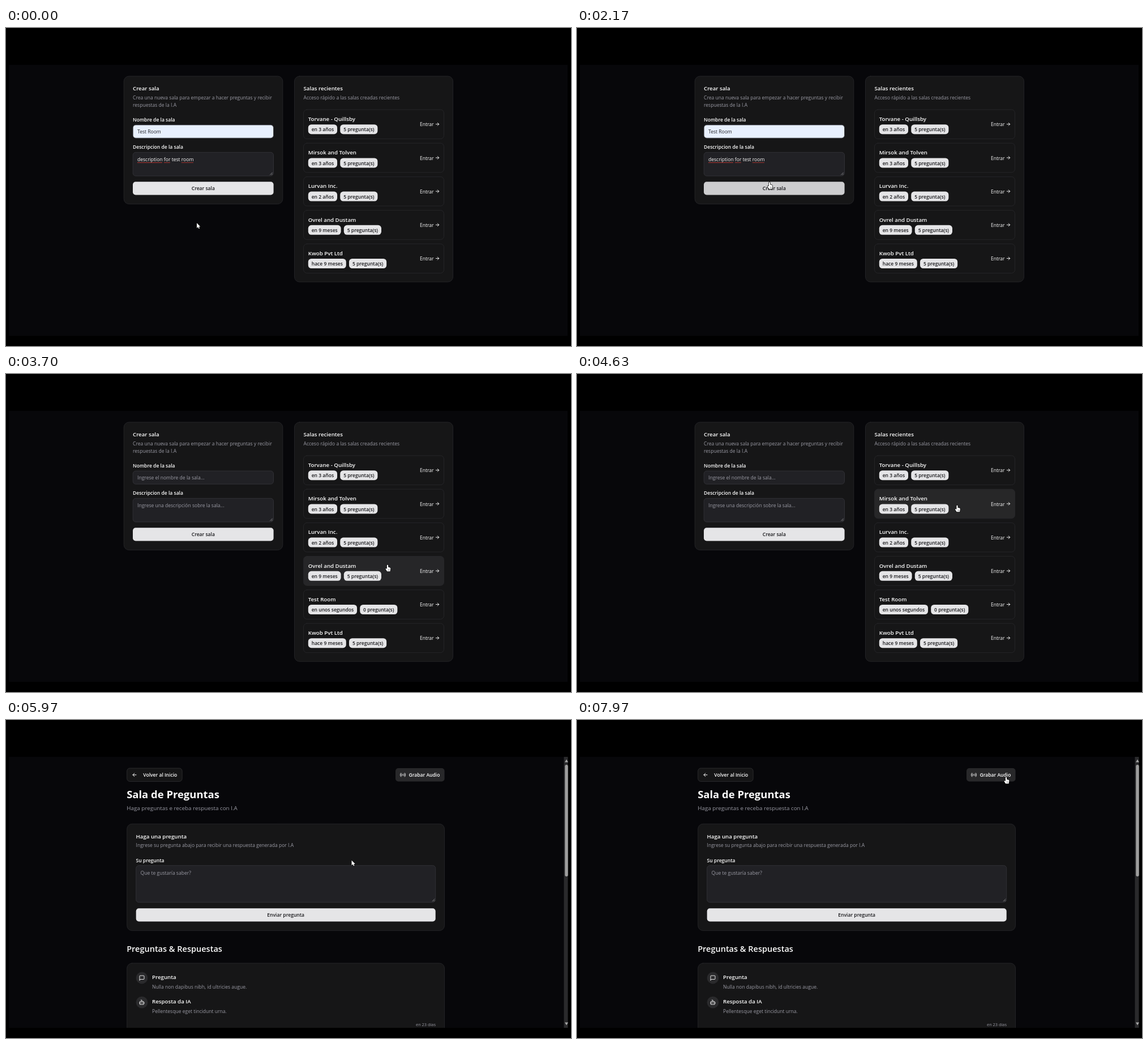
An HTML page with a canvas for the animation above (8 s loop, 998x561 px).

```html
<!DOCTYPE html>
<html lang="es">
<head>
<meta charset="utf-8">
<title>Salas</title>
<style>
  html, body { margin: 0; width: 100%; height: 100%; overflow: hidden; background: #000; }
  canvas { display: block; width: 998px; height: 561px; }
</style>
</head>
<body>
<canvas id="stage" width="998" height="561"></canvas>
<script>
const ctx = document.getElementById('stage').getContext('2d');
const LOOP = 8000;
const RESET_AT = 2200, LISTED_AT = 2270, ROOM_AT = 4670, ANSWERS_AT = 4900;

const color = {
  page: '#07070a', card: '#161617', border: '#29292c', field: '#212125', fieldBorder: '#36363c',
  text: '#fcfcfc', muted: '#9a9aa4', light: '#e5e5e7', lightHover: '#cdcdcf', dark: '#18181b',
  secondary: '#28282a', autofill: '#e8f0fe'
};
const SMALL = 8.55, TITLE = 9.7;

const rooms = [
  ['Torvane - Quillsby', 'en 3 años', 5],
  ['Mirsok and Tolven', 'en 3 años', 5],
  ['Lurvan Inc.', 'en 2 años', 5],
  ['Ovrel and Dustam', 'en 9 meses', 5],
  ['Kwob Pvt Ltd', 'hace 9 meses', 5]
];
const newRoom = ['Test Room', 'en unos segundos', 0];
const roomsAfter = [...rooms.slice(0, 4), newRoom, rooms[4]];

// row index, start, end
const rowHovers = [[4, 2880, 3010], [3, 3270, 3700], [2, 3760, 3870], [1, 3870, ROOM_AT]];

// time, x, y of the pointer tip
const pointerPath = [
  [0, 337, 344], [1230, 337, 344], [1500, 340, 272], [2200, 340, 272], [2500, 400, 330],
  [2670, 400, 330], [2900, 600, 455], [3170, 676.5, 366], [3270, 676.5, 366], [3430, 674, 338],
  [3670, 674, 338], [4100, 671.5, 231.5], [4660, 671.5, 231.5], [4670, 668, 231.5], [4930, 668, 231.5],
  [5500, 610.5, 247.5], [6900, 610.5, 247.5], [7700, 750, 112], [7970, 758, 100.5], [8000, 758, 100.5]
];

const clamp = v => Math.max(0, Math.min(1, v));
const smooth = v => v * v * (3 - 2 * v);
const within = (p, x, y, w, h) => p.x >= x && p.x <= x + w && p.y >= y && p.y <= y + h;
const rowTop = i => 144 + i * 59.2;

function box(x, y, w, h, r, fill, stroke) {
  ctx.beginPath();
  ctx.roundRect(x, y, w, h, r);
  if (fill) { ctx.fillStyle = fill; ctx.fill(); }
  if (stroke) { ctx.strokeStyle = stroke; ctx.lineWidth = 0.8; ctx.stroke(); }
}

function text(str, x, y, size = SMALL, weight = 400, fill = color.text, align = 'left') {
  ctx.font = `${weight} ${size}px "Open Sans", "Noto Sans", sans-serif`;
  ctx.textAlign = align;
  ctx.fillStyle = fill;
  ctx.fillText(str, x, y);
}

function line(path, stroke, width = 1) {
  ctx.strokeStyle = stroke;
  ctx.lineWidth = width;
  ctx.lineCap = ctx.lineJoin = 'round';
  ctx.stroke(new Path2D(path));
}

function at(x, y, draw) {
  ctx.save();
  ctx.translate(x, y);
  draw();
  ctx.restore();
}

function resizeGrip(x, y) {
  line(`M${x - 4} ${y}L${x} ${y - 4}M${x - 1.5} ${y}L${x} ${y - 1.5}`, '#a8a8a8', 0.7);
}

function squiggle(x, y, width) {
  ctx.beginPath();
  for (let i = 0; i <= width; i++) ctx.lineTo(x + i, y + (i % 2 ? 0.5 : -0.5));
  ctx.strokeStyle = '#d8413a';
  ctx.lineWidth = 0.8;
  ctx.stroke();
}

function typedDescription(x, y) {
  const full = 'description for test room';
  text(full, x, y);
  const width = s => ctx.measureText(s).width;
  for (const word of ['description', 'for', 'room']) {
    squiggle(x + width(full.slice(0, full.indexOf(word))), y + 2.2, width(word));
  }
}

function badge(label, x, y) {
  ctx.font = `600 ${SMALL}px "Open Sans", "Noto Sans", sans-serif`;
  const w = ctx.measureText(label).width + 11.8;
  box(x, y, w, 17, 5.5, color.light);
  text(label, x + 5.9, y + 12.1, SMALL, 600, color.dark);
  return w;
}

function hoverAmount(row, t) {
  return rowHovers.reduce((most, [r, from, to]) =>
    r === row ? Math.max(most, clamp((t - from) / 150) * (1 - clamp((t - to) / 100))) : most, 0);
}

function roomRow([name, age, questions], i, t) {
  const y = rowTop(i), hover = hoverAmount(i, t);
  box(525.6, y, 247.9, 51.6, 6, `rgba(50,50,53,${0.6 * hover})`, color.border);
  text(name, 533.7, y + 20, TITLE, 600);
  const w = badge(age, 533.8, y + 26.2);
  badge(`${questions} pregunta(s)`, 533.8 + w + 5.2, y + 26.2);
  text('Entrar', 731, y + 29.4);
  at(762, y + 25.7, () => line('M-2.7 0H2.7M.2 -2.5L2.7 0L.2 2.5', color.text, 0.9));
}

function home(t) {
  const filled = t < RESET_AT;
  box(208.2, 85, 280.6, 225.5, 9, color.card, color.border);
  text('Crear sala', 224, 110, TITLE, 600);
  text('Crea una nueva sala para empezar a hacer preguntas y recibir', 224, 125.6, SMALL, 400, color.muted);
  text('respuestas de la I.A', 224, 138.6, SMALL, 400, color.muted);

  text('Nombre de la sala', 224, 165.2, SMALL, 600);
  box(224.2, 171, 248.3, 23.2, 5, filled ? color.autofill : color.field, color.fieldBorder);
  text(filled ? 'Test Room' : 'Ingrese el nombre de la sala...', 232, 186.3, SMALL, 400, filled ? '#202024' : color.muted);

  text('Descripcion de la sala', 224, 213.2, SMALL, 600);
  box(224.2, 219.3, 248.3, 41.7, 5, color.field, color.fieldBorder);
  if (filled) typedDescription(232, 235.3);
  else text('Ingrese una descripción sobre la sala...', 232, 235.3, SMALL, 400, color.muted);
  resizeGrip(470.5, 259);

  const over = t > 1450 && t < 2270;
  box(224, 271.2, 248.6, 23.3, 5, over ? color.lightHover : color.light);
  text('Crear sala', 348.3, 286.4, SMALL, 600, color.dark, 'center');

  const list = t < LISTED_AT ? rooms : roomsAfter;
  box(509.5, 85, 280, 363 + (list.length - 5) * 59.2, 9, color.card, color.border);
  text('Salas recientes', 525.5, 110, TITLE, 600);
  text('Acceso rápido a las salas creadas recientes', 525.5, 125.6, SMALL, 400, color.muted);
  list.forEach((room, i) => roomRow(room, i, t));
}

function scrollbar() {
  ctx.fillStyle = '#2a2a2c';
  ctx.fillRect(985.5, 65, 7, 478);
  box(987.3, 79, 5.4, 197, 2.7, '#9e9e9e');
  ctx.fillStyle = '#a6a6a6';
  ctx.fill(new Path2D('M987 74.5L990 69.5L993 74.5ZM987 533.5L990 538.5L993 533.5Z'));
}

function entry(y, title, body, icon) {
  ctx.beginPath();
  ctx.arc(240, y, 10.4, 0, Math.PI * 2);
  ctx.fillStyle = '#2a2a2c';
  ctx.fill();
  at(240, y, () => line(icon, color.text, 0.9));
  text(title, 258, y + 2, TITLE, 600);
  text(body, 258, y + 18.9, SMALL, 400, color.muted);
}

function room(t) {
  const loaded = t >= ANSWERS_AT;
  ctx.save();
  if (!loaded) ctx.translate(4.5, 0);

  box(213.7, 85, 97.4, 23.4, 5, '#151516', '#323234');
  at(227, 96.8, () => line('M3 0H-3M-.2 -2.8L-3 0L-.2 2.8', color.text));
  text('Volver al Inicio', 242.3, 100.1, SMALL, 600);

  box(688, 85, 86.6, 23.4, 5, color.secondary);
  at(701, 96.8, () => line(
    'M-.5 0A.5 .5 0 1 0 .5 0A.5 .5 0 1 0 -.5 0M-1.9 -2A2.8 2.8 0 0 0 -1.9 2M1.9 -2A2.8 2.8 0 0 1 1.9 2' +
    'M-3.4 -3.2A4.7 4.7 0 0 0 -3.4 3.2M3.4 -3.2A4.7 4.7 0 0 1 3.4 3.2', color.text, 0.9));
  text('Grabar Audio', 711.6, 100.1, SMALL, 600);

  text('Sala de Preguntas', 213.2, 138.3, 18.45, 700);
  text('Haga preguntas e receba respuesta con I.A', 213.2, 158.9, 9.85, 400, color.muted);

  box(213.7, 183.3, 560.8, 188.3, 9, color.card, color.border);
  text('Haga una pregunta', 229.5, 208.8, TITLE, 600);
  text('Ingrese su pregunta abajo para recibir una respuesta generada por I.A', 229.5, 224.4, SMALL, 400, color.muted);
  text('Su pregunta', 229.5, 250.9, SMALL, 600);
  box(229.7, 256.7, 529, 65, 5, color.field, color.fieldBorder);
  text('Que te gustaría saber?', 237.5, 272.6, SMALL, 400, color.muted);
  resizeGrip(757, 319.8);
  box(229.7, 332.2, 529, 23.2, 5, color.light);
  text('Enviar pregunta', 494.2, 347.2, SMALL, 600, color.dark, 'center');

  text('Preguntas & Respuestas', 213.2, 409, 14.5, 600);
  if (loaded) {
    box(213.7, 429, 560.8, 150, 9, color.card, color.border);
    entry(455, 'Pregunta', 'Nulla non dapibus nibh, id ultricies augue.',
      'M-4 4V-3Q-4 -4 -3 -4H3Q4 -4 4 -3V1.5Q4 2.5 3 2.5H-2.5Z');
    entry(498.2, 'Resposta da IA', 'Pellentesque eget tincidunt urna.',
      'M-3.2 -1.5H3.2V3.6H-3.2ZM0 -1.5V-4H-1.8M-4.6 1H-3.4M3.4 1H4.6M-1.3 .6V1.4M1.3 .6V1.4');
    text('en 23 días', 759, 540, 7.4, 400, color.muted, 'right');
  }
  ctx.restore();
  if (loaded) scrollbar();
}

function pointerAt(t) {
  const i = pointerPath.findIndex(k => k[0] > t);
  const [t0, x0, y0] = pointerPath[i - 1], [t1, x1, y1] = pointerPath[i];
  const k = smooth((t - t0) / (t1 - t0));
  return { x: x0 + (x1 - x0) * k, y: y0 + (y1 - y0) * k };
}

function isClickable(p, t) {
  if (t >= ROOM_AT) return within(p, 688, 85, 86.6, 23.4);
  const list = t < LISTED_AT ? rooms : roomsAfter;
  return within(p, 224, 271, 248.6, 23.5) || list.some((_, i) => within(p, 525.6, rowTop(i), 247.9, 51.6));
}

const arrowShape = new Path2D('M0 0V9L2.1 7.1L3.5 10.1L5 9.4L3.7 6.5H6.4Z');
const handShape = new Path2D('M-1.1 .8Q0 -.8 1.1 .8V4.2L4.2 5Q5.5 5.4 5.4 6.8L4.6 11.8H-.9L-3.5 7.7Q-3.4 6.2 -2.2 6.6L-1.1 7.6Z');

function pointer(t) {
  const p = pointerAt(t);
  at(p.x, p.y, () => {
    const shape = isClickable(p, t) ? handShape : arrowShape;
    ctx.lineJoin = 'round';
    ctx.lineWidth = 1.3;
    ctx.strokeStyle = '#000';
    ctx.stroke(shape);
    ctx.fillStyle = '#fff';
    ctx.fill(shape);
    if (shape === handShape) line('M1.4 8.2V10M3.2 8.2V10', '#555', 0.6);
  });
}

function render(now) {
  const t = now % LOOP;
  ctx.fillStyle = '#000';
  ctx.fillRect(0, 0, 998, 561);
  ctx.save();
  ctx.beginPath();
  ctx.rect(5, 65, 988, 478);
  ctx.clip();
  ctx.fillStyle = color.page;
  ctx.fillRect(5, 65, 987, 478);
  (t < ROOM_AT ? home : room)(t);
  pointer(t);
  ctx.restore();
}

function tick() {
  render(performance.now());
  requestAnimationFrame(tick);
}
tick();
</script>
</body>
</html>
```
